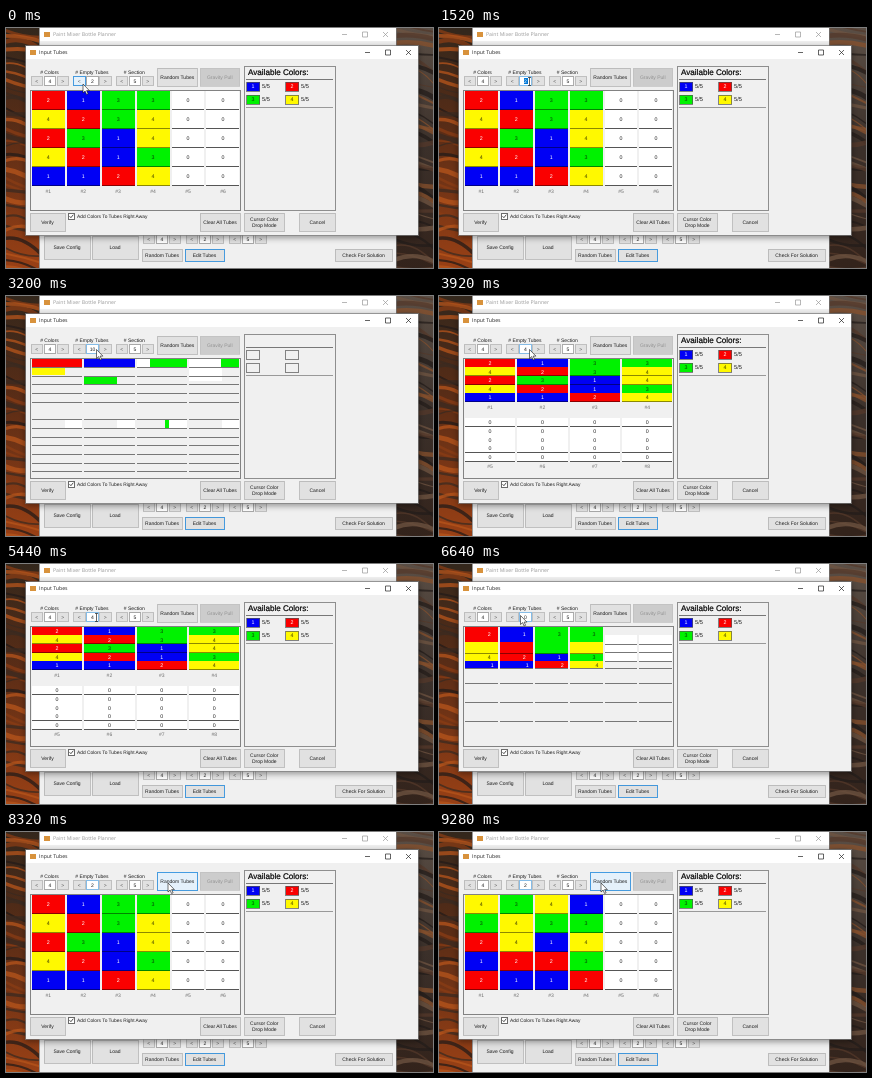
Recreate the animation shown at these times as an HTML page. Size 427 by 240 pixels, loop 9840 ms.

```html
<!DOCTYPE html>
<html lang="en">
<head>
<meta charset="utf-8">
<title>Tube input dialog</title>
<style>
  html, body { margin: 0; width: 100%; height: 100%; overflow: hidden; background: #2f231c; }
  svg { display: block; width: 100%; height: 100%; }
  text { font-family: "Liberation Sans", Arial, sans-serif; text-rendering: geometricPrecision; }
  text.title { font-family: "Open Sans", "Noto Sans", sans-serif; }
  text.heading { stroke: #000; stroke-width: .2px; }
  rect { shape-rendering: crispEdges; }
</style>
</head>
<body>
<svg viewBox="0 0 427 240" preserveAspectRatio="none">
  <defs>
    <linearGradient id="leftArt" x2="0" y2="1">
      <stop offset="0" stop-color="#33271c"/>
      <stop offset=".45" stop-color="#5c2d16"/>
      <stop offset="1" stop-color="#994015"/>
    </linearGradient>
    <linearGradient id="rightArt" x2="0" y2="1">
      <stop offset="0" stop-color="#5a4e45"/>
      <stop offset=".5" stop-color="#3b302a"/>
      <stop offset="1" stop-color="#33231b"/>
    </linearGradient>
    <filter id="shade" x="-10%" y="-10%" width="120%" height="125%">
      <feDropShadow dx="0" dy="2" stdDeviation="3" flood-opacity=".4"/>
    </filter>
  </defs>
  <g id="desk"></g>
  <g id="back"></g>
  <g id="front"></g>
  <g id="live"></g>
</svg>
<script>
const LOOP = 9840, STEP = 80;
const BLUE = '#0078d7', GREY = '#adadad', FACE = '#f0f0f0';
const FILL = ['#fff', '#0000f5', '#fa0000', '#00f200', '#fff900'];
const INK = ['#222', '#fff', '#fff', '#073d07', '#3a3800'];

// One string per tube, top to bottom.
const START = ['24241', '12321', '33112', '34434'];
const MIXED = ['43212', '34421', '43121', '13432'];

const GRID_X = 25.8, GRID_Y = 62.7, GRID_W = 209.6;
const TALL = 19, SHORT = 8.7, SECOND_ROW = 59.5;

const $ = id => document.getElementById(id);
const times = (n, fn) => Array.from({ length: n }, (_, i) => fn(i)).join('');
const clamp = v => Math.min(1, Math.max(0, v));

const rect = (x, y, w, h, fill, stroke = 'none', sw = .7) =>
  `<rect x="${x}" y="${y}" width="${w}" height="${h}" fill="${fill}" stroke="${stroke}" stroke-width="${sw}"/>`;
const hline = (x, y, w, color = '#777') => rect(x, Math.round(y - .5), w, 1, color);
const text = (s, x, y, { size = 5, fill = '#1c1c1c', anchor = 'middle', cls = '' } = {}) =>
  `<text x="${x}" y="${y + size * .36}" text-anchor="${anchor}" class="${cls}" font-size="${size}" fill="${fill}">${s}</text>`;

function button(x, y, w, h, label, { fill = '#e1e1e1', stroke = GREY, ink } = {}) {
  const lines = label.split('|');
  return rect(x, y, w, h, fill, stroke) + lines.map((s, i) =>
    text(s, x + w / 2, y + h / 2 + (i - (lines.length - 1) / 2) * 6, { fill: ink })).join('');
}

const hotStyle = hot => ({ fill: hot ? '#e5f1fb' : '#e1e1e1', stroke: hot ? BLUE : GREY });

function spinner(x, y, value, { hot, focus, selected } = {}) {
  const arrow = (dx, s, on) => button(x + dx, y, 11.5, 8.5, s, { ...hotStyle(on), ink: '#555' });
  return arrow(0, '&lt;', hot) + arrow(26, '&gt;') +
    rect(x + 13, y, 11.5, 8.5, '#fff', focus ? '#5ba7e3' : '#8a8a8a') +
    (selected ? rect(x + 17, y + 1, 4.5, 6.5, BLUE) : '') +
    text(value, x + 19, y + 4.3, { fill: selected ? '#fff' : '#1c1c1c' });
}

function caption(x, y, right, label, ink) {
  return rect(x, y - 3, 5.5, 5.5, '#d8923c') +
    text(label, x + 9, y, { size: 5.2, anchor: 'start', cls: 'title', fill: ink }) +
    `<path d="M${right - 53} ${y}h5m15.500-2.500h5v5h-5zm20.500 0l5 5m0-5l-5 5" fill="none" stroke="${ink}" stroke-width=".7"/>`;
}

function drawDesk() {
  let seed = 11;
  const rand = () => (seed = seed * 16807 % 2147483647) / 2147483647;
  const strokes = (x, w, colors) => times(36, i => {
    const y = i * 7 - 6, bend = 24 * rand() - 12;
    return `<path d="M${x} ${y}q${w / 2} ${bend} ${w} ${20 * rand()}" fill="none" stroke-opacity=".75"
      stroke="${colors[Math.floor(rand() * colors.length)]}" stroke-width="${1 + 4 * rand()}"/>`;
  });
  $('desk').innerHTML =
    rect(0, 0, 214, 240, 'url(#leftArt)') + strokes(-4, 40, ['#b7541b', '#231b18', '#8a3c15', '#3a2a20']) +
    rect(214, 0, 213, 240, 'url(#rightArt)') + strokes(388, 42, ['#6f5442', '#231c1a', '#54392a', '#87512c']);
}

function drawBack() {
  $('back').innerHTML = rect(33, -2, 357, 245, FACE, '#777') + rect(33.5, 0, 356, 13, '#fff') +
    caption(38, 6.5, 389, 'Paint Mixer Bottle Planner', '#999') +
    ['Save Config', 'Load'].map((s, i) => button(38 + i * 48, 208, 46, 23, s)).join('') +
    [4, 2, 5].map((n, i) => spinner(137 + i * 43, 206.5, n)).join('') +
    button(136, 221, 40, 12, 'Random Tubes') +
    button(179, 221, 39, 12, 'Edit Tubes', { stroke: BLUE }) +
    button(329, 221, 57, 12, 'Check For Solution');
}

function drawFront() {
  $('front').innerHTML =
    `<g filter="url(#shade)">${rect(19.5, 17.5, 392.5, 189.5, FACE, '#777')}</g>` +
    rect(20, 18, 391.5, 13, '#fff') + caption(24, 24.5, 412, 'Input Tubes', '#222') +
    ['# Colors', '# Empty Tubes', '# Section'].map((s, i) => text(s, 43.5 + i * 42.4, 44)).join('') +
    spinner(25, 48.5, 4) + spinner(110, 48.5, 5) +
    button(194, 40, 39.5, 18, 'Gravity Pull', { fill: '#ccc', stroke: '#bfbfbf', ink: '#929292' }) +
    rect(62.5, 185.5, 5.5, 5.5, '#fff', '#333') +
    '<path d="M63.5 188.2l1.4 1.5 2.4-3" fill="none" stroke="#222" stroke-width=".8"/>' +
    text('Add Colors To Tubes Right Away', 71, 188.2, { size: 4.85, anchor: 'start' }) +
    button(24, 185, 35, 18, 'Verify') +
    button(194, 185, 40, 18, 'Clear All Tubes') +
    button(238.5, 185, 39.5, 18, 'Cursor Color|Drop Mode') +
    button(293.5, 185, 35.5, 18, 'Cancel');
}

function cell(x, y, w, h, n, label = true, dx = 0) {
  return rect(x, y, w, h, FILL[n]) + hline(x, y + h, w, +n ? 'rgba(0,0,0,.45)' : '#555') +
    (label ? text(n, x + w / 2 + dx, y + h / 2, { fill: INK[n], size: 5.3 }) : '');
}

const columnX = (i, perRow) => GRID_X + (i % perRow) * GRID_W / perRow;
const columnW = perRow => GRID_W / perRow - 2;

function grid(tubes, perRow) {
  const h = perRow === 6 ? TALL : SHORT - .1, w = columnW(perRow);
  return times(perRow === 6 ? 6 : 8, i => {
    const x = columnX(i, perRow), y = GRID_Y + Math.floor(i / perRow) * SECOND_ROW;
    return [...(tubes[i] || '00000')].map((n, r) => cell(x, y + r * h, w, h, n)).join('') +
      text('#' + (i + 1), x + w / 2, y + 5 * h + 5, { fill: '#6d6d6d' });
  });
}

const rule = (y, perRow) => times(perRow, i => hline(columnX(i, perRow), y, columnW(perRow)));
const shortRules = (perRow, count) => times(count, k => k === 5 ? '' : rule(GRID_Y + (k + 1) * SHORT, perRow));
const tallRules = () => times(3, k => rule(GRID_Y + (k + 3) * TALL, 6));

// Half-repainted grid while the layout grows to eight tubes.
function growing() {
  const w = columnW(4), part = w * .65;
  return times(4, i => {
    const x = columnX(i, 4), from = w * clamp((i - 1.3) * .37);
    const row = i % 2 + 1;
    return rect(x, GRID_Y, from, SHORT, '#fff') +
      rect(x + from, GRID_Y, w - from, SHORT, FILL[START[i][0]]) +
      (i < 2 ? rect(x, GRID_Y + row * SHORT, part, SHORT - 1, FILL[START[i][row]]) : '') +
      (i === 3 ? rect(x, GRID_Y + SHORT, part, 1.6 * SHORT, '#fff') : '') +
      rect(x + part, 123, w - part, SHORT, '#fff');
  }) + rect(159, 123, 4, SHORT, FILL[3]) + shortRules(4, 13);
}

// Half-repainted grid while the layout shrinks back: the third row is squeezed out.
function shrinking() {
  const w = columnW(6);
  return times(6, i => {
    const x = columnX(i, 6), tube = START[i];
    if (!tube) return rect(x, GRID_Y + SHORT, w, 3 * SHORT, '#fff') +
      times(3, k => hline(x, GRID_Y + (k + 2) * SHORT, w));
    return cell(x, GRID_Y, w, 15.3, tube[0], true, 8) + cell(x, 78, w, 11.5, tube[1], false) +
      cell(x, 89.5, w, 7.5, tube[3], true, 8) + cell(x, 97, w, 7.5, tube[4], true, 11);
  }) + rule(104.5, 6) + tallRules();
}

function shuffled(t) {
  const done = Math.floor(clamp((t - 8400) / 800) * 20);
  return START.map((tube, i) => [...tube].map((n, r) => i * 5 + r < done ? MIXED[i][r] : n).join(''));
}

function gridAt(t) {
  if (t < 2800) return grid(START, 6);
  if (t < 3040) return shortRules(4, 13);
  if (t < 3520) return growing();
  if (t < 6080) return grid(START, 4);
  if (t < 6320) return shortRules(6, 5) + tallRules();
  if (t < 6800) return shrinking();
  return grid(shuffled(t), 6);
}

function colorsAt(t) {
  const blank = t >= 2800 && t < 3600, late = t >= 6320 && t < 6800;
  return rect(238.5, 38.5, 90.5, 143.5, FACE, '#666') +
    hline(240, 51, 87) + hline(240, 79, 87, '#999') +
    (blank ? '' : text('Available Colors:', 242, 43.6, { size: 8.1, anchor: 'start', fill: '#000', cls: 'heading' })) +
    times(4, i => {
      const x = 240.5 + i % 2 * 39, y = 54 + Math.floor(i / 2) * 13, n = i + 1;
      const box = rect(x, y, 13, 9, blank ? FACE : FILL[n], '#555');
      if (blank) return box;
      return box + text(n, x + 6.5, y + 4.5, { fill: INK[n], size: 5.3 }) +
        (late && n === 4 ? '' : text('5/5', x + 15.5, y + 4.3, { size: 5.7, anchor: 'start' }));
    });
}

// Each move: start, end, and the place reached.
const MOVES = [
  { from: 480, to: 1440, x: 90.5, y: 53.5 },
  { from: 5760, to: 6160, x: 81.5, y: 51.5 },
  { from: 6880, to: 7760, x: 162, y: 51 }
];

function pointerAt(t) {
  let x = 77, y = 56;
  for (const m of MOVES) {
    const k = clamp((t - m.from) / (m.to - m.from)), e = k * k * (3 - 2 * k);
    x += (m.x - x) * e;
    y += (m.y - y) * e;
  }
  const typing = (t >= 1200 && t < 2560) || (t >= 4480 && t < 5840);
  const shape = typing
    ? '<path d="M-1.500-4h3M0-4v8M-1.500 4h3" stroke="#222" stroke-width=".7"/>'
    : '<path d="M0 0v9l2.100-1.900 1.500 3.400 1.500-.7-1.500-3.200h2.800z" fill="#fff" stroke="#111" stroke-width=".6"/>';
  return `<g transform="translate(${x} ${y})">${shape}</g>`;
}

function valueAt(t) {
  if (t < 1920 || t >= 6880) return 2;
  if (t < 2240) return 1;
  if (t < 3600) return 10;
  return t < 5520 ? 4 : 0;
}

function drawLive(t) {
  const look = hotStyle(t >= 7600);
  if (t >= 8400 && t < 8560) look.fill = '#cce4f7';
  $('live').innerHTML =
    spinner(67.5, 48.5, valueAt(t), { hot: t < 640, focus: t >= 1440, selected: t >= 1440 && t < 1920 }) +
    button(151.5, 40, 39.5, 18, 'Random Tubes', look) +
    rect(24, 62, 210.5, 120, FACE, '#555') + gridAt(t) + colorsAt(t) + pointerAt(t);
}

drawDesk();
drawBack();
drawFront();

const begin = performance.now();
let shown = -1;
function tick() {
  const t = Math.floor((performance.now() - begin) % LOOP / STEP) * STEP;
  if (t !== shown) drawLive(shown = t);
  requestAnimationFrame(tick);
}
tick();
</script>
</body>
</html>
```
